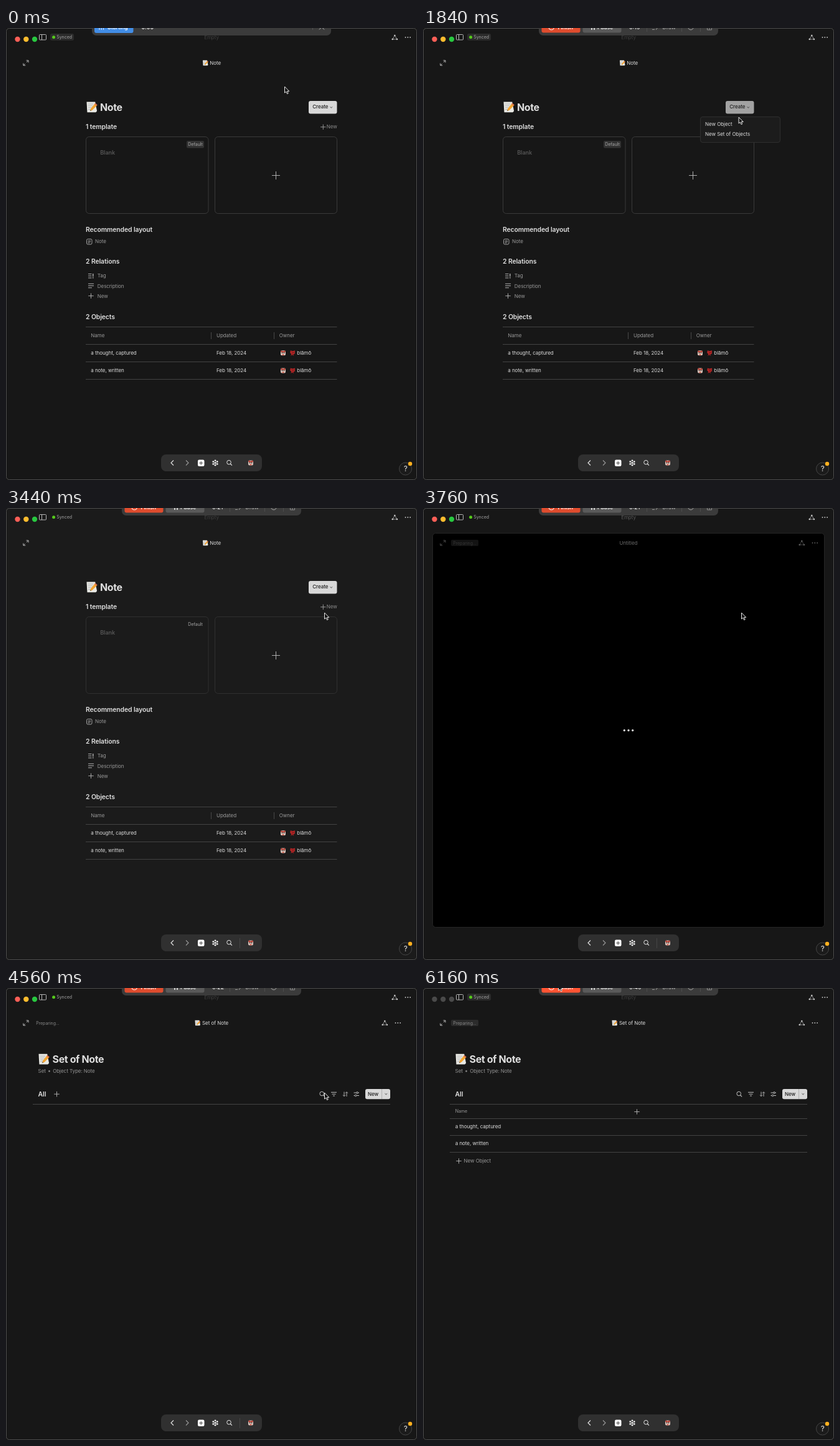
Write an HTML page that moves like this. It is 660 px wide and 725 px high and loops after 6240 ms.

```html
<!DOCTYPE html>
<html lang="en">
<head>
<meta charset="utf-8">
<title>Note type to set</title>
<style>
html, body { margin: 0; width: 100%; height: 100%; overflow: hidden; background: #171717; }
svg { display: block; width: 660px; height: 725px; font-family: Inter, sans-serif; }
text { white-space: pre; }
</style>
</head>
<body>
<svg id="stage" viewBox="0 0 660 725" xmlns="http://www.w3.org/2000/svg"></svg>
<script>
const LOOP = 6240, STEP = 80;
const stage = document.getElementById('stage');

// Drawing helpers
const text = (x, y, s, fill = '#dcdcdc', size = 8, weight = 400, extra = '') =>
  `<text x="${x}" y="${y}" fill="${fill}" font-size="${size}" font-weight="${weight}" letter-spacing="-.05" ${extra}>${s}</text>`;
const mid = (x, y, s, fill, size, weight) => text(x, y, s, fill, size, weight, 'text-anchor="middle"');
const head = (x, y, s) => text(x, y, s, '#e0e0e0', 10.4, 600, 'style="letter-spacing:-.1px"');
const title = (x, y, s) => text(x, y, s, '#dedede', 16, 700, 'style="letter-spacing:-.4px"');
const rect = (x, y, w, h, r, fill, extra = '') =>
  `<rect x="${x}" y="${y}" width="${w}" height="${h}" rx="${r}" fill="${fill}" ${extra}/>`;
const dot = (x, y, r, fill, extra = '') => `<circle cx="${x}" cy="${y}" r="${r}" fill="${fill}" ${extra}/>`;
const line = (d, color, w = 1, extra = '') =>
  `<path d="${d}" fill="none" stroke="${color}" stroke-width="${w}" ${extra}/>`;
const rule = (x1, x2, y) => line(`M${x1} ${y}H${x2}`, '#434343');
const plus = (x, y, r, color = '#b8b8b8') => line(`M${x - r} ${y}h${2 * r}M${x} ${y - r}v${2 * r}`, color, 0.9);
const group = (id, body, extra = '') => `<g id="${id}" ${extra}>${body}</g>`;
const at = (x, y, k, body) => `<g transform="translate(${x} ${y}) scale(${k})">${body}</g>`;

const memo = (x, y, k) => at(x, y, k,
  `<path d="M1 1H15L18 16 16 18H2Z" fill="#e9e9e4"/>` +
  line('M3 4.5H12M3 7.5H11M3.5 10.5H9M3.5 13.5H8', '#a7a9ac', 0.9) +
  `<path d="M15 3L18.5 6 10.5 14.5 6.8 15.8 7.8 12Z" fill="#f3a532"/>` +
  `<path d="M15 3L18.5 6 17.2 7.4 13.8 4.3Z" fill="#d96a55"/><path d="M6.8 15.8L7.3 14 8.6 15.2Z" fill="#333"/>`);
const avatar = (x, y) => at(x, y, 1,
  rect(-4, -4, 8, 8, 2, '#d9c6bd') +
  `<path d="M-4 -3L-2 -4 0 -2.5 2 -4 4 -3 3 -1H-3Z" fill="#b3382d"/>` +
  dot(-1.5, 0, 0.9, '#3c2723') + dot(1.5, 0, 0.9, '#3c2723') +
  `<path d="M-2 3.8L0 1.5 2 3.8Z" fill="#d14a38"/>`);
const rose = (x, y) => at(x, y, 1,
  `<path d="M-3.5 -4L0 -3 3.8 -4 3.5 1 1 2.5 2 4.5 -1 3 -3 4.5 -2 1.5 -4 0Z" fill="#b92727"/>` +
  line('M-2 -2L1 0 2.5 -2M-1 1L1 3', '#5b1515', 0.9));
const graph = (x, y, c) => line(`M${x} ${y - 3}L${x - 3.6} ${y + 3}H${x + 3.6}Z`, c, 0.7) +
  [[0, -3], [-3.6, 3], [3.6, 3]].map(([a, b]) => dot(x + a, y + b, 1.3, c)).join('');
const more = (x, y, c) => [-3.8, 0, 3.8].map(d => dot(x + d, y, 0.9, c)).join('');
const expand = c => line('M33 55L35.5 52.5M32.5 52H36V55.5M30.5 57.5L28 60M27.8 56.5V60H31.3', c, 0.9);
const lens = (x, y, r, c) => dot(x, y, r, 'none', `stroke="${c}" stroke-width="1"`) +
  line(`M${x + r * 0.7} ${y + r * 0.7}l2.6 2.6`, c, 1.1);
const chevron = (x, y, c = '#333') => line(`M${x - 1.8} ${y - 0.8}l1.8 1.7 1.8-1.7`, c, 0.9);

// Window frame and controls
function chrome() {
  return group('lights', dot(18.5, 18, 4.2, '#ff5f57') + dot(32.3, 18, 4.2, '#febc2e') + dot(46, 18, 4.2, '#28c840')) +
    group('greys', [18.5, 32.3, 46].map(x => dot(x, 18, 4.2, '#4a4a4a')).join('')) +
    rect(53.5, 10.5, 11, 8.5, 1, 'none', 'stroke="#b5b5b5"') + line('M57.5 10.5v8.5', '#b5b5b5') +
    rect(71, 9, 38, 11, 2.5, '#2b2b2b', 'class="tag"') + dot(76.6, 14.8, 2.5, '#55c91c') +
    text(81.3, 17.3, 'Synced', '#a2a2a2', 7) +
    `<g id="empty">${mid(330, 17.6, 'Empty', 'currentColor', 8)}</g>` +
    graph(624.3, 15, '#c4c4c4') + more(645.3, 15, '#c4c4c4');
}

function dock() {
  const petals = [0, 1, 2, 3, 4, 5].map(i => {
    const a = i * Math.PI / 3 + Math.PI / 6;
    return dot(336 + 3.7 * Math.cos(a), 697.5 + 3.7 * Math.sin(a), 1.4, '#f0f0f0');
  }).join('');
  return rect(249, 684, 162, 27, 8, '#303030') +
    line('M269 693.5l-4 4 4 4', '#e6e6e6', 1.1) + line('M289 693.5l4 4-4 4', '#9a9a9a', 1.1) +
    rect(308, 692.5, 10.5, 10.5, 2.2, '#fff') + plus(313.2, 697.8, 3, '#303030') +
    petals + dot(336, 697.5, 1.6, '#f0f0f0') + lens(358, 696.7, 3.3, '#e6e6e6') +
    line('M375.5 690v16', '#464646', 1, 'class="bare"') + avatar(393, 697.5) +
    dot(641.5, 707, 10, '#1b1b1b', 'stroke="#454545"') + mid(641.7, 711, '?', '#d0d0d0', 11.5, 500) +
    dot(649, 699, 3.2, '#ffb01f');
}

// Screens
function typePage() {
  const row = (y, name) => text(136.3, y, name) + text(338, y, 'Feb 18, 2024') +
    avatar(445, y - 3) + rose(460.3, y - 3) + text(467.3, y, 'blāmō');
  const relation = (y, s) => text(146.8, y, s, '#989898');
  return expand('#c8c8c8') + memo(315.5, 51.2, 0.5) + text(327.3, 58.9, 'Note') +
    memo(128.5, 117.5, 0.98) + title(151, 132.8, 'Note') +
    rect(486, 117, 45.5, 20.5, 3, '#d8d8d8', 'id="create"') + text(492.3, 129.4, 'Create', '#1d1d1d', 8, 500) + chevron(522.3, 127.2) +
    head(128, 162, '1 template') + plus(509.3, 158.8, 4.2, '#a4a4a4') + text(514.8, 161.2, 'New', '#8c8c8c') +
    `<g id="cards" fill="none">${rect(128.5, 174.5, 196.5, 123, 5, 'none')}${rect(335.5, 174.5, 196, 123, 5, 'none')}</g>` +
    rect(290, 181, 28, 11.5, 2, '#333', 'class="tag"') + mid(304, 189.2, 'Default', '#a6a6a6', 7) +
    text(151.2, 202.8, 'Blank', '#555', 9, 600) + plus(433.5, 236.5, 6.5, '#bcbcbc') +
    head(128, 327, 'Recommended layout') +
    rect(129.5, 338.5, 8.5, 8.5, 2, 'none', 'stroke="#a0a0a0"') + line('M131.5 341.2h4.5M131.5 343h4.5M131.5 344.8h2.8', '#a0a0a0', 0.9) +
    text(143, 345.3, 'Note', '#989898') +
    head(128, 378, '2 Relations') +
    line('M132 394.5h5.5M132 397.7h5.5M132 400.9h5.5', '#b0b0b0') + line('M139.8 394v4.7M139.8 399.8v1.6', '#b0b0b0', 1.4) +
    line('M132 410.3h9M132 413.5h9M132 416.7h6', '#b0b0b0') + plus(136.5, 429.7, 4.2) +
    relation(400.4, 'Tag') + relation(416.5, 'Description') + relation(432.5, 'New') +
    head(128, 467.3, '2 Objects') +
    [479.5, 507.5, 535.5, 563.5].map(y => rule(128, 531.5, y)).join('') +
    line('M329.5 488v11M430.5 488v11', '#484848') +
    text(136.3, 496.3, 'Name', '#999') + text(338, 496.3, 'Updated', '#999') + text(438.7, 496.3, 'Owner', '#999') +
    row(524.2, 'a thought, captured') + row(552.4, 'a note, written');
}

function menu() {
  return rect(445.5, 142.5, 128, 41, 3.5, '#1c1c1c', 'stroke="#2f2f2f"') +
    rect(445.5, 163, 128, 16, 0, '#454545', 'id="hover"') +
    text(453, 157.3, 'New Object') + text(453, 173.2, 'New Set of Objects');
}

function loading() {
  return rect(15.5, 40.5, 629, 632, 5, '#000', 'stroke="#262626"') + expand('#555') +
    rect(45, 51, 44, 10, 2, '#131313') + text(48.2, 58.6, 'Preparing...', '#353535', 7) +
    mid(330, 58.9, 'Untitled', '#6a6a6a', 8) + graph(608.3, 56, '#5c5c5c') + more(629.3, 56, '#5c5c5c') +
    group('dots', [323.3, 330, 336.7].map(x => dot(x, 0, 1.6, '#f0f0f0')).join(''));
}

function setPage() {
  const c = '#c0c0c0';
  const rows = text(51.8, 200.3, 'Name', '#999', 7) + plus(343.5, 198.5, 4.2) +
    [209.5, 236.5, 263.5].map(y => rule(43, 617, y)).join('') +
    text(51.8, 225, 'a thought, captured') + text(51.8, 252.2, 'a note, written') +
    plus(57.5, 277.5, 4.2) + text(65.5, 280.2, 'New Object', '#999');
  return expand('#c8c8c8') + rect(45, 51, 44, 10, 2, '#2b2b2b', 'class="tag"') +
    text(48.2, 58.6, 'Preparing...', '#858585', 7) +
    memo(303, 51.2, 0.5) + text(315, 58.9, 'Set of Note') + graph(608.3, 56, c) + more(629.3, 56, c) +
    memo(51.5, 104.8, 0.98) + title(74.6, 119.8, 'Set of Note') +
    text(51.6, 136.2, 'Set', '#959595') + dot(69.5, 133.4, 1.3, '#8a8a8a') + text(75.2, 136.2, 'Object Type: Note', '#959595') +
    head(51.6, 174, 'All') + group('addView', plus(81.5, 170.2, 4.3)) + rule(43, 617, 186.5) +
    lens(507.2, 169.5, 3.3, c) + line('M522 167.3h9M523.5 170.2h6M525 173h3', c) +
    line('M543 166.5v7M541 171.7l2 2 2-2M547 174v-7M545 168.7l2-2 2 2', c, 0.9) +
    line('M558.5 168h4M565.5 168h1.5M558.5 172.5h1.5M563 172.5h4', c) +
    dot(564, 168, 1.4, 'none', `stroke="${c}" stroke-width=".9"`) + dot(561.5, 172.5, 1.4, 'none', `stroke="${c}" stroke-width=".9"`) +
    rect(577, 162, 40, 16.3, 3, '#d8d8d8') + line('M603.5 162v16', '#b0b0b0') +
    text(581, 173.1, 'New', '#1d1d1d', 8, 500) + chevron(610.3, 170) +
    group('rows', rows);
}

// Recorder bar, cut off by the top edge
function recorder() {
  const bar = (x, w) => rect(x, -20, w, 32, 7, '#3b3b3b');
  const label = (x, s, c = '#eee') => text(x, 2.4, s, c, 8.6, 600);
  return group('starting', bar(138, 384) + rect(142, -14, 62.5, 22, 3, '#428de6') +
      line('M150 -3v6M153.3 -4v7M156.5 -3v6', '#cfe2fb', 1.2) + label(163, 'Starting', '#fff') +
      label(217.5, '0:00') + line('M492.5 0v3', '#555') + line('M503 2.5l4-4 4 4', '#bbb')) +
    group('running', bar(186, 288) + rect(190.5, -14, 62, 21.5, 3, '#df4c2e', 'id="finish"') +
      dot(206.2, -1.2, 4.2, 'none', 'stroke="#ffe1d9" stroke-width="1.1"') + label(216.5, 'Finish', '#fff') +
      rect(256.5, -14, 62, 21.5, 3, '#5a5a5a') + line('M271 -4v7M275 -4v7', '#eee', 1.6) + label(280, 'Pause') +
      `<text id="timer" x="331" y="2.4" fill="#eee" font-size="8.8" font-weight="500"></text>` +
      line('M359.5 0v6M415.5 0v6M445.5 0v6', '#4c4c4c') +
      line('M368 2.5h4M374 3l3-4', '#999') + label(384.5, 'Draw', '#999') +
      dot(430, -1.3, 4.2, 'none', 'stroke="#aaa"') + line('M456.5 0v3h7V0M460 0v3', '#8a8a8a'));
}

stage.innerHTML = rect(0, 0, 660, 725, 0, '#171717', 'id="back"') +
  chrome() +
  group('frame', rect(15.5, 40.5, 629, 632, 5, 'none', 'stroke="#212121"')) +
  group('typePage', typePage()) + group('loading', loading()) + group('setPage', setPage()) +
  dock() + group('menu', menu()) +
  rect(0.5, 0.5, 659, 724, 5, 'none', 'stroke="#4d4d4d"') + recorder() +
  group('cursor', '<path d="M0 0V10L2.3 8 4 11.6 5.7 10.8 4.1 7.4H7.2Z" fill="#111" stroke="#fff" stroke-width=".9"/>');

const el = {};
stage.querySelectorAll('[id]').forEach(n => el[n.id] = n);
const tags = stage.querySelectorAll('.tag'), bare = stage.querySelectorAll('.bare');

const path = [[0, 447.5, 94], [720, 447.5, 94], [1280, 503.5, 128.5], [1600, 503.5, 128.5], [2000, 509, 151],
  [2240, 509, 151], [2480, 513, 165.5], [2640, 511.5, 168], [5200, 511.5, 168], [5600, 217.5, -6], [LOOP, 217.5, -6]];
const clock = [[80, '0:17'], [560, '0:18'], [1360, '0:19'], [2160, '0:20'], [3200, '0:21'], [4160, '0:22'], [5280, '0:23'], [5840, '0:40']];

const ramp = (t, a, b) => Math.min(1, Math.max(0, (t - a) / (b - a)));
const within = (t, a, b) => t >= a && t < b;
const show = (node, on) => node.setAttribute('visibility', on ? 'inherit' : 'hidden');

function pointer(t) {
  const i = path.findIndex((p, k) => k && t <= p[0]);
  const [a, x, y] = path[i - 1], [b, u, v] = path[i];
  let k = ramp(t, a, b);
  k = k * k * (3 - 2 * k);
  return [x + (u - x) * k, y + (v - y) * k];
}

function draw(time) {
  const t = Math.floor((time % LOOP) / STEP) * STEP;
  const [x, y] = pointer(t);
  const busy = within(t, 3760, 4560);
  const tagged = t < 80 || within(t, 1680, 2880) || within(t, 3840, 4560) || t >= 6000;

  el.cursor.setAttribute('transform', `translate(${x} ${y})`);
  el.back.setAttribute('fill', within(t, 2320, 3760) ? '#1b1b1b' : '#171717');
  tags.forEach(n => show(n, tagged));
  bare.forEach(n => show(n, !tagged));
  show(el.frame, within(t, 2320, 2880));
  show(el.lights, t < 5840);
  show(el.greys, t >= 5840);
  el.empty.setAttribute('color', busy ? '#5a5a5a' : '#3f3f3f');

  show(el.typePage, t < 3760);
  el.create.setAttribute('fill', within(t, 1200, 2720) ? '#a2a2a2' : '#d8d8d8');
  el.cards.setAttribute('stroke', tagged ? '#3a3a3a' : '#303030');
  el.menu.setAttribute('opacity', ramp(t, 1600, 1840) * (1 - ramp(t, 2640, 2880)));
  el.hover.setAttribute('y', y < 163 ? 147 : 163);
  show(el.hover, y >= 147);

  show(el.loading, busy);
  el.dots.setAttribute('transform', `translate(0 356.7) scale(1 ${1 - 0.35 * ramp(t, 4080, 4240)})`);
  show(el.setPage, t >= 4560);
  show(el.rows, t >= 4640);
  show(el.addView, t < 5520);

  show(el.starting, t < 80);
  show(el.running, t >= 80);
  el.finish.setAttribute('fill', t >= 5600 ? '#ff5433' : '#df4c2e');
  el.timer.textContent = clock.reduce((s, [at, v]) => t >= at ? v : s, '');
}

const start = performance.now();
function tick() {
  draw(performance.now() - start);
  requestAnimationFrame(tick);
}
tick();
</script>
</body>
</html>
```
